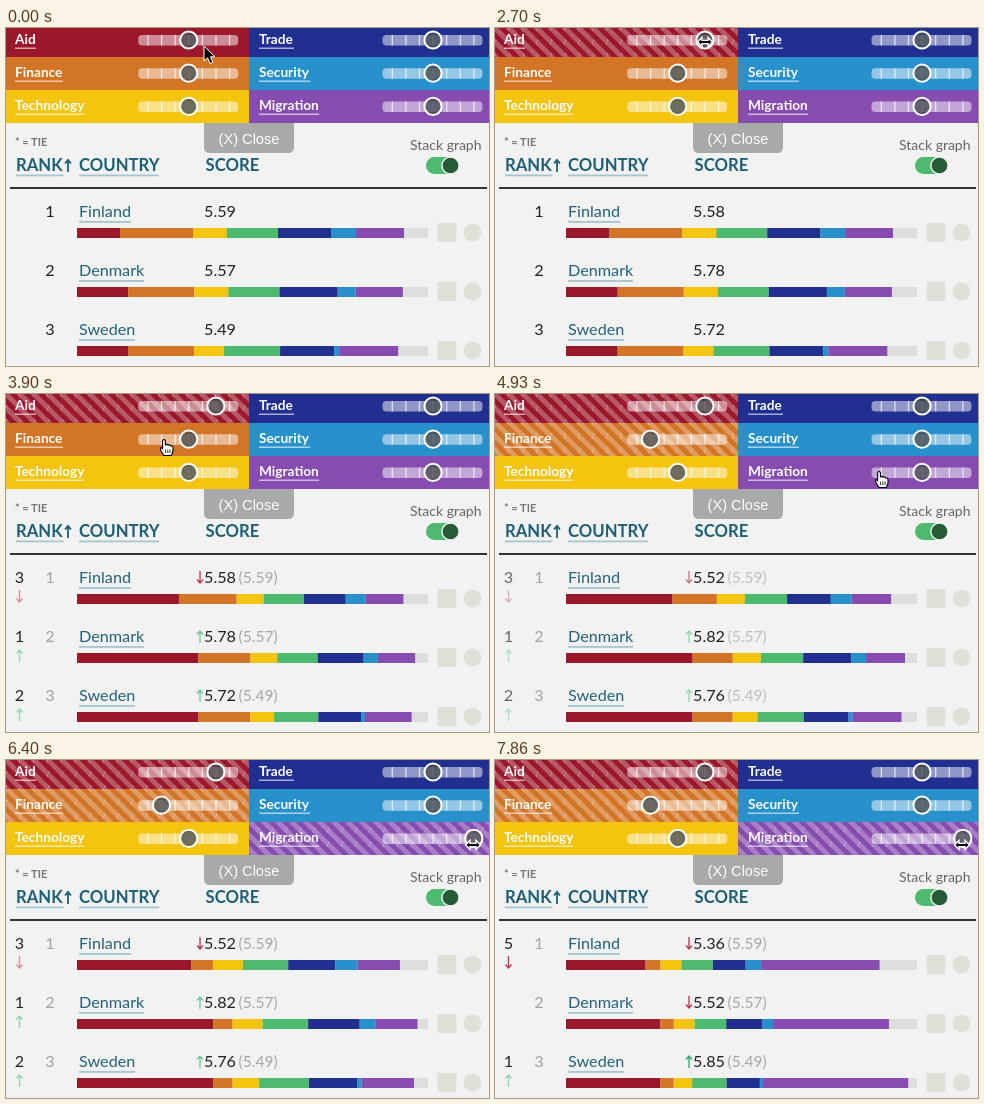
An HTML page for the animation above (8000 ms loop, 483 by 338 pixels).

```html
<!DOCTYPE html>
<html lang="en">
<head>
<meta charset="utf-8">
<title>Country ranking</title>
<style>
  html, body { margin: 0; width: 100%; height: 100%; overflow: hidden; background: #f2f2f2; }
  svg { display: block; width: 483px; height: 338px; font: 16.2px Lato, sans-serif; }
  .label { font-size: 13.7px; font-weight: 700; fill: #fff; }
  .head { font-size: 16.7px; font-weight: 700; fill: #1f5f76; }
  .country { fill: #246178; }
  .dark { fill: #222; }
  .mid { text-anchor: middle; }
  .old { font-size: 15.6px; fill: #a8a8a8; }
  .arrow { fill: none; stroke-width: 1.3; }
</style>
</head>
<body>
<svg id="stage" viewBox="0 0 483 338">
  <defs>
    <pattern id="stripes" width="14" height="14" patternUnits="userSpaceOnUse">
      <path d="M0 0L14 14M-7 7L7 21M7 -7L21 7" stroke="#fff" stroke-opacity=".28" stroke-width="4.9"/>
      <path d="M-14 0L0 14M14 0L28 14" stroke="#fff" stroke-opacity=".28" stroke-width="4.9"/>
    </pattern>
  </defs>
</svg>
<script>
const LOOP = 8000;
const stage = document.getElementById('stage');
const colors = {
  aid: '#9b172c', finance: '#d27526', tech: '#f5c40f', green: '#4dba6f',
  trade: '#212f90', security: '#2890cb', migration: '#864cb0'
};
const barColors = Object.values(colors);

// Slider cells: label, colour, column, row, underline width
const cells = [
  ['Aid', colors.aid, 0, 0, 21], ['Finance', colors.finance, 0, 1, 48],
  ['Technology', colors.tech, 0, 2, 69], ['Trade', colors.trade, 1, 0, 35],
  ['Security', colors.security, 1, 1, 51], ['Migration', colors.migration, 1, 2, 60]
];
// When a slider jumps: [time, cell, notches from centre]
const drags = [[2250, 0, 2], [4040, 1, -2], [5800, 5, 3]];
// When results start to change, and the category weights from then on
const phases = [
  { at: -9999, weights: [1, 1, 1, 1, 1, 1, 1] },
  { at: 2570, weights: [3, 1, 1, 1, 1, 1, 1] },
  { at: 4474, weights: [3, 1 / 3, 1, 1, 1, 1, 1] },
  { at: 6600, weights: [3, 1 / 3, 1, 1, 1, 1, 4] }
];
const rows = [
  { name: 'Finland', line: 52, parts: [43, 73, 34, 51, 53, 25, 48], scores: [5.59, 5.58, 5.52, 5.36], ranks: [1, 3, 3, 5] },
  { name: 'Denmark', line: 65, parts: [51, 66, 34, 51, 58, 18, 47], scores: [5.57, 5.78, 5.82, 5.52], ranks: [2, 1, 1, 2] },
  { name: 'Sweden', line: 56, parts: [51, 66, 30, 56, 54, 5, 59], scores: [5.49, 5.72, 5.76, 5.85], ranks: [3, 2, 2, 1] }
];
const cursorPath = [
  [0, 198, 18, 'pointer'], [140, 198, 18, 'pointer'], [450, 204, 14, 'hand'], [600, 207, 12, 'hand'],
  [1949, 207, 12, 'hand'], [1950, 210, 13, 'hand'], [2249, 210, 13, 'hand'],
  [2250, 210, 14, 'resize'], [2850, 210, 14, 'resize'], [3000, 209, 14, 'hand'], [3150, 205, 19, 'hand'],
  [3750, 158, 45, 'hand'], [4039, 158, 45, 'hand'], [4040, 155, 46, 'resize'], [4339, 155, 46, 'resize'],
  [4480, 175, 47, 'hand'], [4926, 384, 77, 'hand'], [5505, 467, 77, 'hand'], [5799, 467, 77, 'hand'],
  [5800, 467, 85, 'resize'], [LOOP, 467, 85, 'resize']
];

function add(tag, attrs, parent = stage, text) {
  const node = document.createElementNS('http://www.w3.org/2000/svg', tag);
  for (const key in attrs) node.setAttribute(key, attrs[key]);
  if (text !== undefined) node.textContent = text;
  parent.append(node);
  return node;
}
const rect = (x, y, width, height, fill, more) => add('rect', { x, y, width, height, fill, ...more });
const write = (x, y, cls, text, parent) => add('text', { x, y, class: cls }, parent, text);
const set = (node, attrs) => { for (const key in attrs) node.setAttribute(key, attrs[key]); };
const clamp = v => Math.max(0, Math.min(1, v));
const mix = (a, b, p) => a + (b - a) * p;
const cubic = p => p < .5 ? 4 * p ** 3 : 1 - 4 * (1 - p) ** 3;
const arrowPath = (x, y, up) => up
  ? `M${x} ${y + 13}V${y + 1}M${x - 3} ${y + 4.5}L${x} ${y + 1}L${x + 3} ${y + 4.5}`
  : `M${x} ${y}V${y + 12}M${x - 3} ${y + 8.5}L${x} ${y + 12}L${x + 3} ${y + 8.5}`;

// Slider panel
const sliders = cells.map(([name, fill, col, row, line]) => {
  const left = col * 243, top = row ? row * 33 - 4 : 0, height = row ? 33 : 29;
  const x = left ? 253 : 9, mid = 12 + row * 33.2, centre = left ? 427 : 182.7;
  rect(left, top, left ? 240 : 243, height, fill);
  const stripe = rect(left, top, left ? 240 : 243, height, 'url(#stripes)');
  write(x, 16 + row * 33, 'label', name);
  rect(x, 19.5 + row * 33, line, 1.5, '#fff', { opacity: .6 });
  rect(centre - 50.5, mid - 5, 100, 10.5, '#fff', { rx: 4, opacity: .5 });
  for (let n = -3; n <= 3; n++) rect(centre - .5 + n * 13.6, mid - 5, 1.2, 10.5, '#fff', { opacity: .75 });
  const knob = add('circle', { cy: mid, r: 8.6, fill: '#464b50', 'fill-opacity': .78, stroke: '#fff', 'stroke-width': 2 });
  return { stripe, knob, centre };
});

// Table heading
add('path', { d: 'M198 95h90v24q0 6-6 6h-78q-6 0-6-6z', fill: '#a9a9a9' });
add('text', { x: 243, y: 115.5, class: 'mid', fill: '#fff', style: 'font:14.6px "Liberation Sans",Arial,sans-serif' }, stage, '(X) Close');
add('text', { x: 9, y: 118, fill: '#777', style: 'font-size:11px;font-weight:700' }, stage, '* = TIE');
add('text', { x: 404, y: 121.5, fill: '#666', style: 'font-size:14px' }, stage, 'Stack graph');
rect(420, 129, 32.5, 17, '#4dba6f', { rx: 8.5 });
add('circle', { cx: 444.5, cy: 137.5, r: 8.6, fill: '#255c35', stroke: '#f2f2f2', 'stroke-width': 1.5 });
write(10, 143, 'head', 'RANK');
write(73, 143, 'head', 'COUNTRY');
write(199.5, 143, 'head', 'SCORE');
add('path', { d: arrowPath(62, 131, true), class: 'arrow', stroke: '#1f5f76', style: 'stroke-width:1.8' });
rect(10, 146.5, 47.5, 1.8, '#a6c5cf');
rect(73, 146.5, 80, 1.8, '#a6c5cf');
rect(4, 159, 477, 2, '#333');

// Table rows
const views = rows.map((row, i) => {
  const y = 189 + i * 59;
  const first = write(44, y, 'dark mid', row.ranks[0]);
  write(73, y, 'country', row.name);
  rect(73, y + 4, row.line, 1.8, '#a6c5cf');
  const score = write(198, y, 'dark', '');
  rect(71, y + 11, 351, 10, '#dedede');
  const bars = barColors.map(fill => rect(71, y + 11, 0, 10, fill));
  rect(431.5, y + 6, 19, 19, '#e0dfd8', { rx: 1 });
  add('circle', { cx: 466.5, cy: y + 15.5, r: 9, fill: '#e0dfd8' });
  const extra = add('g', {});
  write(232.5, y, 'old', `(${row.scores[0].toFixed(2)})`, extra);
  const scoreArrow = add('path', { class: 'arrow' }, extra);
  const rank = write(13.5, y, 'dark mid', '', extra);
  const rankArrow = add('path', { class: 'arrow' }, extra);
  return { y, first, score, bars, extra, scoreArrow, rank, rankArrow };
});

// Cursors, each with its hot spot at the origin
const cursors = {
  pointer: add('path', { d: 'M0 0V15L3.6 11.8L6 17.5L8.8 16.3L6.4 10.8H11Z', fill: '#000', stroke: '#fff', 'stroke-width': 1 }),
  hand: add('g', {}),
  resize: add('path', {
    d: 'M-7.5 0L-3 -4.5V-1.6H3V-4.5L7.5 0L3 4.5V1.6H-3V4.5Z', fill: '#000', stroke: '#fff', 'stroke-width': 1.4
  })
};
add('path', {
  d: 'M-1.4 1.5Q0 -.6 1.4 1.5V6Q3 4.6 4.2 6.3Q5.8 5.2 6.7 7Q8.8 6.3 9 8.8V12L7.4 16.5H-.2L-3.2 11.2Q-4.3 8.6 -2.5 8.6L-1.4 9.8Z',
  fill: '#fff', stroke: '#000', 'stroke-width': 1.1, 'stroke-linejoin': 'round'
}, cursors.hand);
add('path', { d: 'M1.6 10.5V14M3.8 10.5V14M6 10.5V14', stroke: '#000', 'stroke-width': .8 }, cursors.hand);

function widths(row, phase) {
  const raw = row.parts.map((part, k) => part * phases[phase].weights[k]);
  const scale = row.scores[phase] * 58.5 / raw.reduce((a, b) => a + b);
  return raw.map(w => w * scale);
}

function drawRow(row, view, t, phase) {
  const prev = Math.max(0, phase - 1);
  const progress = cubic(clamp((t - phases[phase].at) / 1000));
  const from = widths(row, prev), to = widths(row, phase);
  let x = 71;
  view.bars.forEach((bar, k) => {
    const width = mix(from[k], to[k], progress);
    set(bar, { x, width });
    x += width;
  });
  view.score.textContent = row.scores[phase].toFixed(2);

  // Rank changes follow the score a little later and fade in
  const late = t - phases[phase].at - 280;
  const shown = late < 0 ? prev : phase;
  const fade = clamp(late / 1000);
  const visible = shown === 0 ? 0 : late < 0 ? 1 : phase === 1 ? fade : mix(.6, 1, fade);
  view.extra.setAttribute('opacity', visible);
  view.first.setAttribute('opacity', 1 - .62 * (shown > 1 ? 1 : visible));

  const gain = row.scores[shown] - row.scores[0], climb = row.ranks[0] - row.ranks[shown];
  set(view.scoreArrow, {
    d: arrowPath(194, view.y - 12, gain > 0),
    stroke: gain > .3 ? '#2fa66b' : gain > 0 ? '#6cc793' : '#b5344a'
  });
  view.rank.textContent = climb ? row.ranks[shown] : '';
  set(view.rankArrow, {
    d: climb ? arrowPath(13.5, view.y + 7, climb > 0) : '',
    stroke: climb > 0 ? '#93d6ae' : climb < -2 ? '#b5344a' : '#d98a98'
  });
}

function drawCursor(t) {
  const next = cursorPath.findIndex(key => key[0] > t);
  const a = cursorPath[next - 1], b = cursorPath[next];
  const p = (t - a[0]) / (b[0] - a[0]);
  for (const kind in cursors) cursors[kind].style.display = kind === a[3] ? '' : 'none';
  cursors[a[3]].setAttribute('transform', `translate(${mix(a[1], b[1], p)} ${mix(a[2], b[2], p)})`);
}

// The picture advances in steps of about 150 ms
const step = t => t < 3900 ? Math.floor(t / 150) * 150 : 3900 + Math.floor((t - 3900) / 146.6) * 146.6;

function render(time) {
  const t = step(time % LOOP);
  sliders.forEach(({ stripe, knob, centre }, i) => {
    const drag = drags.find(([at, cell]) => cell === i && t >= at);
    stripe.style.display = drag ? '' : 'none';
    knob.setAttribute('cx', centre + (drag ? drag[2] * 13.6 : 0));
  });
  const phase = phases.findLastIndex(p => t >= p.at);
  rows.forEach((row, i) => drawRow(row, views[i], t, phase));
  drawCursor(t);
}

const start = performance.now();
function tick() {
  render(performance.now() - start);
  requestAnimationFrame(tick);
}
tick();
</script>
</body>
</html>
```
